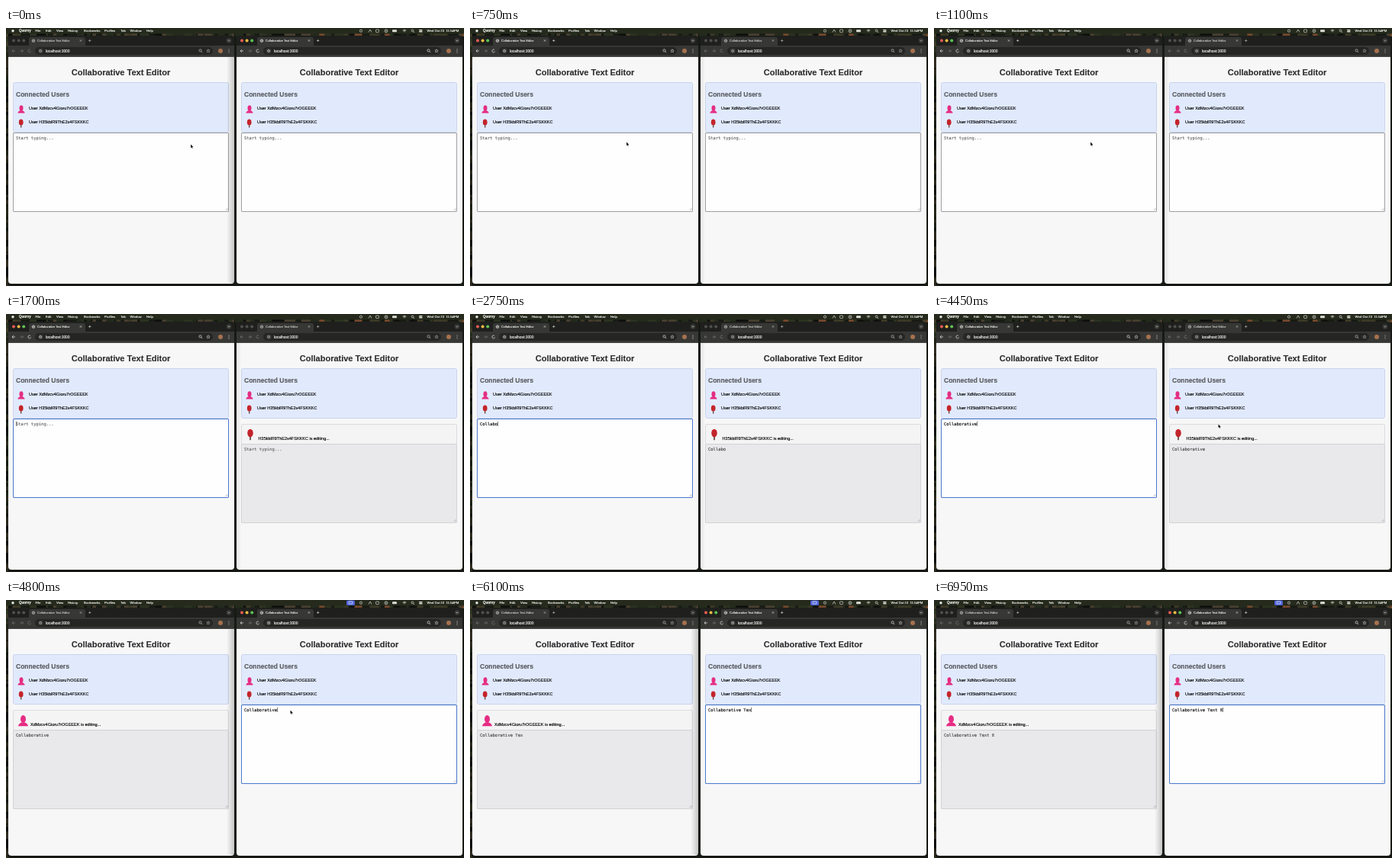
Write an HTML page with a canvas that moves like this. It is 600 by 338 pixels and loops after 7 s.

```html
<!DOCTYPE html>
<html lang="en">
<head>
<meta charset="utf-8">
<title>Collaborative Text Editor</title>
<style>
html, body { margin: 0; width: 100%; height: 100%; overflow: hidden; background: #171a14; }
canvas { display: block; }
</style>
</head>
<body>
<canvas id="stage" width="600" height="338"></canvas>
<script>
const c = document.getElementById('stage').getContext('2d');
const LOOP = 7000, OFFSET = 299;
const SANS = '"Liberation Sans", Arial, sans-serif';
const MONO = '"DejaVu Sans Mono", monospace';
const PINK = 'XdMzcv4Gioru7rOGEEEK', RED = 'H35kblR9ThE2s4FSKKKC';
const PHRASE = 'Collaborative Text Editor';

// Moments of the session, in ms
const LEFT_FRONT = 400, LEFT_FOCUS = 1350, LEFT_TYPE = 1950, LEFT_KEY = 125;
const RIGHT_FRONT = 4500, RIGHT_FOCUS = 4650, RIGHT_TYPE = 5200, RIGHT_KEY = 270;

// A hairline stroke gives small type its full weight
function text(str, x, y, size, color, weight = '', family = SANS) {
  c.font = `${weight} ${size}px ${family}`;
  c.fillStyle = c.strokeStyle = color;
  c.lineWidth = 0.15;
  c.fillText(str, x, y);
  c.strokeText(str, x, y);
}

function box(x, y, w, h, r, fill, stroke, line = 1) {
  c.beginPath();
  c.roundRect(x, y, w, h, r);
  if (fill) { c.fillStyle = fill; c.fill(); }
  if (stroke) { c.strokeStyle = stroke; c.lineWidth = line; c.stroke(); }
}

function oval(x, y, rx, ry, color, from = 0, to = 7) {
  c.beginPath();
  c.ellipse(x, y, rx, ry, 0, from, to);
  c.fillStyle = color;
  c.fill();
}

const dot = (x, y, r, color) => oval(x, y, r, r, color);

function ring(x, y, r, color, from = 0, to = 7) {
  c.beginPath();
  c.arc(x, y, r, from, to);
  c.strokeStyle = color;
  c.lineWidth = 0.7;
  c.stroke();
}

function lines(color, width, ...paths) {
  c.strokeStyle = color;
  c.lineWidth = width;
  c.beginPath();
  for (const p of paths)
    for (let i = 0; i < p.length; i += 2) i ? c.lineTo(p[i], p[i + 1]) : c.moveTo(p[i], p[i + 1]);
  c.stroke();
}

function wallpaper() {
  c.fillStyle = '#171a14';
  c.fillRect(0, 0, 600, 338);
  let seed = 11;
  const rand = () => (seed = seed * 16807 % 2147483647) / 2147483647;
  const tones = ['#2c3420', '#3d3a26', '#0d0f0b', '#4a4030', '#232b1c'];
  for (let i = 0; i < 110; i++) {
    const x = rand() * 600, w = 3 + rand() * 10;
    c.fillStyle = x > 400 && rand() < 0.2 ? '#7a4a2c' : tones[rand() * 5 | 0];
    c.fillRect(x, 7, w, 4);
    c.fillStyle = tones[rand() * 5 | 0];
    c.fillRect(0, rand() * 338, 3, 6);
  }
  c.fillStyle = 'rgba(8,9,7,.35)';
  c.fillRect(0, 30, 3, 308);
}

function menuBar(sharing) {
  c.fillStyle = '#252a1d';
  c.fillRect(0, 0, 600, 7.5);
  dot(9, 3.7, 1.7, '#e8e8e4');
  text('Quorvy', 17, 5.2, 4.5, '#f6f6f2', 'bold');
  const items = { File: 38.5, Edit: 52, View: 66, History: 81, Bookmarks: 102,
    Profiles: 129, Tab: 150, Window: 162.5, Help: 184 };
  for (const name in items) text(name, items[name], 5.2, 4.25, '#f0f0ec');
  if (sharing) {
    box(446, 0.5, 11, 6.5, 1.5, '#4d62d8');
    box(449, 2, 5, 3, 0.5, null, '#fff', 0.7);
  }
  const ink = '#deded8';
  ring(465, 3.7, 1.6, ink);
  lines(ink, 0.7, [475, 5.5, 477, 2, 479, 5.5]);
  box(484.5, 2, 4, 3.6, 1, null, ink, 0.7);
  ring(498, 3.8, 2, ink);
  dot(498, 3.8, 0.7, ink);
  box(506, 2.3, 6, 3, 1, ink);
  for (const r of [1, 2.2, 3.3]) ring(522, 5.6, r, ink, 3.9, 5.5);
  ring(532.5, 3.4, 1.4, ink);
  lines(ink, 0.8, [533.5, 4.4, 535, 6]);
  box(541, 2, 4.6, 1.5, 0.7, ink);
  box(541, 4, 4.6, 1.5, 0.7, ink);
  text('Wed Oct 23  11:54PM', 551.5, 5.2, 4.3, '#f4f4f0');
}

function pinkAvatar(x, y, s) {
  oval(x, y - 1.6 * s, 2.5 * s, 3.6 * s, '#e62c83');
  oval(x, y + 5 * s, 4.6 * s, 3.6 * s, '#e62c83', Math.PI, 2 * Math.PI);
}

function redAvatar(x, y, s) {
  oval(x, y - 1.5 * s, 2.9 * s, 4 * s, '#c4242b');
  c.fillStyle = '#55302c';
  c.fillRect(x - 0.6 * s, y + 2.3 * s, 1.2 * s, 3.2 * s);
}

function browserBar(active) {
  box(3, 10, 296, 27.5, [4, 4, 0, 0], '#1f201e');
  ['#ee5d53', '#f3bd42', '#5dc352'].forEach((color, i) =>
    dot(10 + i * 6.6, 16.5, 2, active ? color : '#50514e'));
  const ink = active ? '#e4e4e0' : '#c2c2be';
  box(30, 12, 74, 14, 3, '#373835');
  c.fillStyle = '#373835';
  c.fillRect(3, 23, 296, 14.5);
  ring(36, 16.7, 1.8, ink);
  lines(ink, 0.5, [34.2, 16.7, 37.8, 16.7], [36, 15, 36, 18.5]);
  text(PHRASE, 41, 18, 3.95, ink);
  lines(ink, 0.6, [96.8, 15.3, 99.2, 17.7], [99.2, 15.3, 96.8, 17.7]);
  lines(ink, 0.6, [108, 16.5, 111.4, 16.5], [109.7, 14.8, 109.7, 18.2]);
  dot(292, 16.5, 3.2, '#3b3c39');
  lines(ink, 0.7, [290.7, 15.9, 292, 17.2, 293.3, 15.9]);

  const nav = active ? ink : '#777874';
  lines(nav, 0.7, [12, 30, 8, 30], [10, 28, 8, 30, 10, 32]);
  lines('#777874', 0.7, [18.5, 30, 22.5, 30], [20.5, 28, 22.5, 30, 20.5, 32]);
  ring(30.8, 30, 1.9, nav, 0.3, 5.5);
  box(38, 25, 233, 10, 5, '#252624');
  dot(45.2, 30, 3.2, '#3d3e3b');
  ring(45.2, 30, 1.4, ink);
  text('localhost:3000', 52, 31.7, 4.9, '#ecece8');
  ring(254.5, 29.4, 1.6, ink);
  lines(ink, 0.8, [255.7, 30.6, 257.2, 32.1]);
  c.beginPath();
  for (let i = 0; i < 10; i++) {
    const r = i % 2 ? 1 : 2.3, a = i * Math.PI / 5 - Math.PI / 2;
    c.lineTo(265 + r * Math.cos(a), 30 + r * Math.sin(a));
  }
  c.closePath();
  c.strokeStyle = ink;
  c.lineWidth = 0.5;
  c.stroke();
  dot(281, 30, 3, '#a5714f');
  for (const y of [28, 30, 32]) dot(292, y, 0.55, ink);
}

// state: 'idle', 'focus' or 'locked' (somebody else is editing)
function textArea(state, typed) {
  const locked = state === 'locked', focus = state === 'focus';
  const y = locked ? 170 : 137;
  const fill = locked ? '#e9e8ea' : '#fefefe';
  const stroke = locked ? '#d0ced2' : focus ? '#4a78cc' : '#969699';
  box(9.5, y + 0.5, 282, 103, 0.5, fill, stroke, focus ? 1 : 0.9);
  lines('#88888a', 0.5, [287.5, y + 102, 290.5, y + 99], [289.2, y + 102, 290.5, y + 100.7]);
  const color = !typed ? '#6c6c6e' : locked ? '#4a4a4c' : '#101010';
  text(typed || 'Start typing...', 13, y + 8.8, 5.5, color, '', MONO);
  if (focus) {
    c.fillStyle = '#222';
    c.fillRect(13 + c.measureText(typed).width, y + 3.8, 0.6, 6);
  }
}

function page(state, typed, editor) {
  box(3, 37.5, 296, 297.5, [0, 0, 4, 4], '#f7f7f8');
  text(PHRASE, 85.8, 62, 11, '#2d2d2f', 'bold');
  box(9.5, 71.5, 282, 65, 2, '#e1eafc', '#c0cce6', 0.8);
  text('Connected Users', 13, 89.8, 8.5, '#5a5c62', 'bold');
  pinkAvatar(20, 106.5, 1);
  text('User ' + PINK, 30, 107.4, 5.52, '#060608');
  redAvatar(19.7, 125, 1);
  text('User ' + RED, 30, 124.7, 5.52, '#060608');
  if (state === 'locked') {
    box(9.5, 144.5, 282, 26, 1.5, '#f4f4f5', '#d6d5d8', 0.8);
    if (editor === PINK) pinkAvatar(22.5, 158.2, 1.4);
    else redAvatar(21, 158, 1.3);
    text(editor + ' is editing...', editor === PINK ? 32 : 31.6, 165, 5.52, '#060608');
  }
  textArea(state, typed);
}

function browser(x, active, state, typed, editor) {
  c.save();
  c.translate(x, 0);
  page(state, typed, editor);
  browserBar(active);
  c.restore();
}

function shadow(from, to, alpha) {
  const g = c.createLinearGradient(from, 0, to, 0);
  g.addColorStop(0, 'rgba(0,0,0,0)');
  g.addColorStop(1, `rgba(0,0,0,${alpha})`);
  c.fillStyle = g;
  c.fillRect(Math.min(from, to), 38, Math.abs(to - from), 296);
}

function pointer(x, y) {
  c.beginPath();
  [[0, 0], [0, 4.6], [1.1, 3.7], [1.9, 5.3], [2.7, 4.9], [2, 3.4], [3.3, 3.3]]
    .forEach(([dx, dy]) => c.lineTo(x + dx, y + dy));
  c.closePath();
  c.strokeStyle = '#fff';
  c.lineWidth = 0.8;
  c.stroke();
  c.fillStyle = '#111';
  c.fill();
}

function movePointer(t) {
  const glide = (start, end) => {
    const u = Math.min(1, Math.max(0, (t - start) / (end - start)));
    return u * u * (3 - 2 * u);
  };
  if (t < 1450) {
    const u = glide(0, 700);
    pointer(242 - 37 * u, 152.5 - 3 * u);
  } else if (t > 3950 && t < RIGHT_TYPE) {
    const u = glide(3950, 4450);
    pointer(205 + 167.5 * u, 149.5 - 5 * u);
  }
}

function draw(t) {
  const rightActive = t < LEFT_FRONT || t >= RIGHT_FRONT;
  const keys = (start, step) => Math.max(0, Math.floor((t - start) / step) + 1);
  const typed = PHRASE.slice(0, Math.min(13, keys(LEFT_TYPE, LEFT_KEY)) + keys(RIGHT_TYPE, RIGHT_KEY));
  let left = 'idle', right = 'idle';
  if (t >= LEFT_FOCUS && t < RIGHT_FRONT) [left, right] = ['focus', 'locked'];
  if (t >= RIGHT_FOCUS) [left, right] = ['locked', 'focus'];

  wallpaper();
  menuBar(t >= RIGHT_FRONT);
  browser(0, !rightActive, left, typed, PINK);
  browser(OFFSET, rightActive, right, typed, RED);
  if (rightActive) shadow(289, 299, 0.2);
  else shadow(308, 302, 0.08);
  movePointer(t);
}

function frame(now) {
  draw(now % LOOP);
  requestAnimationFrame(frame);
}
requestAnimationFrame(frame);
</script>
</body>
</html>
```
